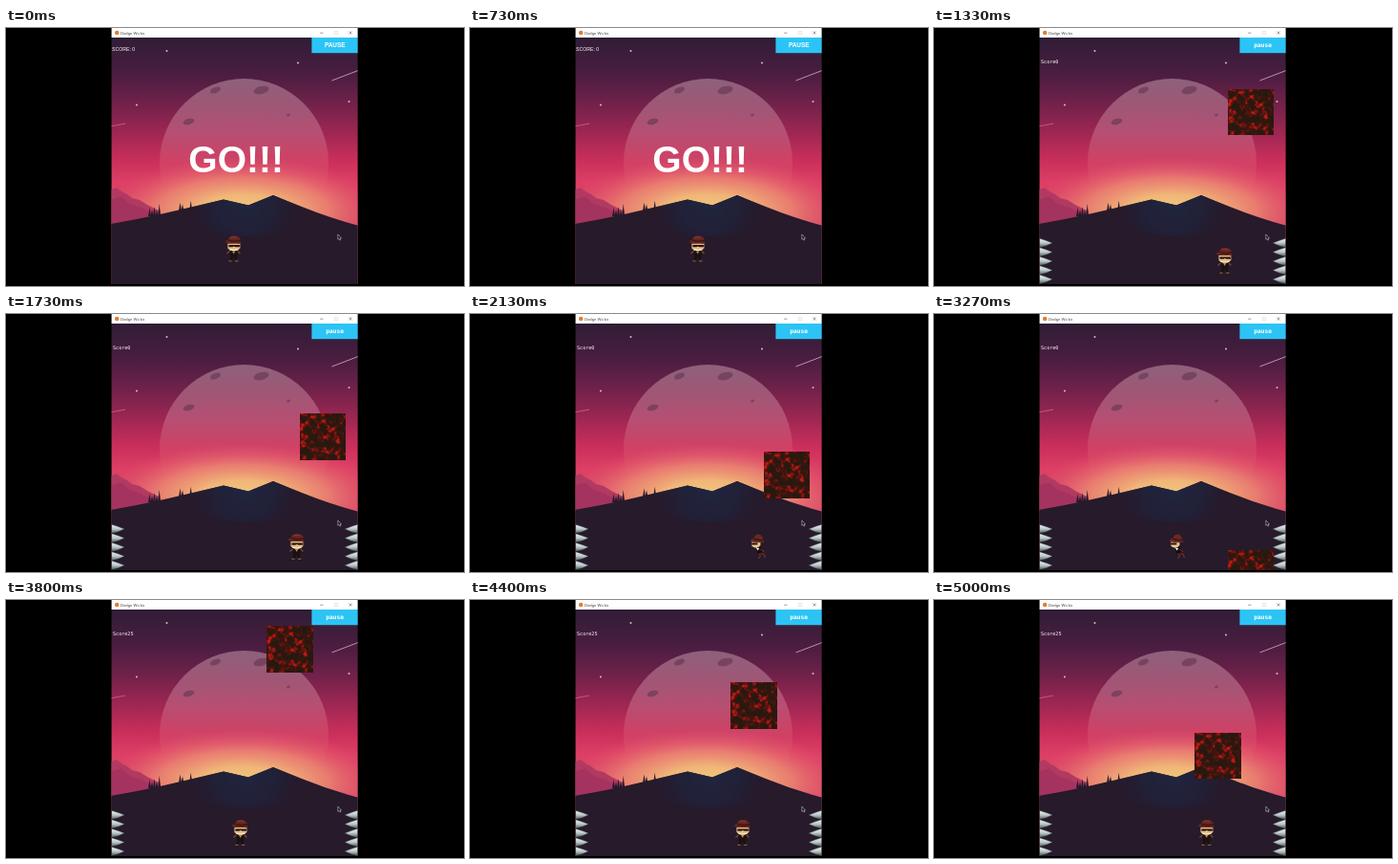
Write an HTML page that moves like this. It is 480 px wide and 270 px high and loops after 5070 ms.

```html
<!DOCTYPE html>
<html lang="en">
<head>
<meta charset="utf-8">
<title>Dodging game</title>
<style>
html, body { margin: 0; width: 100%; height: 100%; overflow: hidden; background: #000; }
svg { display: block; width: 100vw; height: 100vh; }
text { font-family: "Liberation Sans", Arial, sans-serif; fill: #fff; }
.mono { font-family: "DejaVu Sans Mono", monospace; }
</style>
</head>
<body>
<svg viewBox="0 0 480 270">
  <defs>
    <linearGradient id="sky" x1="0" y1="10" x2="0" y2="200" gradientUnits="userSpaceOnUse">
      <stop offset="0" stop-color="#301d36"/>
      <stop offset=".2" stop-color="#4a1d41"/>
      <stop offset=".38" stop-color="#75224b"/>
      <stop offset=".53" stop-color="#a02753"/>
      <stop offset=".68" stop-color="#ca2f5b"/>
      <stop offset=".8" stop-color="#dd3f65"/>
      <stop offset="1" stop-color="#d84a68"/>
    </linearGradient>
    <radialGradient id="glow" cx="0" cy="0" r="1" gradientUnits="userSpaceOnUse"
      gradientTransform="translate(248 191) scale(150 56)">
      <stop offset="0" stop-color="#f3c87c"/>
      <stop offset=".3" stop-color="#f0b678"/>
      <stop offset=".6" stop-color="#ec8a72" stop-opacity=".8"/>
      <stop offset="1" stop-color="#e04a68" stop-opacity="0"/>
    </radialGradient>
    <linearGradient id="moon" x1="0" y1="53" x2="0" y2="168" gradientUnits="userSpaceOnUse">
      <stop offset="0" stop-color="#cfaab8" stop-opacity=".48"/>
      <stop offset=".5" stop-color="#da8ba2" stop-opacity=".4"/>
      <stop offset="1" stop-color="#f58a80" stop-opacity="0"/>
    </linearGradient>
    <radialGradient id="navy" cx="250" cy="182" r="66" gradientUnits="userSpaceOnUse">
      <stop offset="0" stop-color="#20253f"/>
      <stop offset=".5" stop-color="#212037"/>
      <stop offset="1" stop-color="#261a2b" stop-opacity="0"/>
    </radialGradient>
    <linearGradient id="steel" x1="0" y1="0" x2="0" y2="1">
      <stop offset="0" stop-color="#eef2f0"/>
      <stop offset=".5" stop-color="#bcc8c6"/>
      <stop offset="1" stop-color="#46565a"/>
    </linearGradient>
    <filter id="lava" x="0" y="0" width="1" height="1" color-interpolation-filters="sRGB">
      <feTurbulence type="fractalNoise" baseFrequency=".14" numOctaves="4" seed="7"/>
      <feColorMatrix values="2.8 0 0 0 -1  2.8 0 0 0 -1  2.8 0 0 0 -1  0 0 0 0 1"/>
      <feComponentTransfer>
        <feFuncR type="table" tableValues=".15 .17 .25 .48 .72"/>
        <feFuncG type="table" tableValues=".1 .1 .08 .08 .12"/>
        <feFuncB type="table" tableValues=".06 .06 .06 .06 .08"/>
      </feComponentTransfer>
    </filter>
    <clipPath id="view"><rect x="110.600" y="10" width="258" height="258"/></clipPath>
  </defs>

  <rect width="480" height="270" fill="#000"/>
  <g clip-path="url(#view)">
    <rect x="110" y="10" width="260" height="258" fill="url(#sky)"/>
    <rect x="110" y="120" width="260" height="90" fill="url(#glow)"/>
    <circle cx="249.500" cy="141.500" r="88.500" fill="url(#moon)"/>
    <g fill="#6d3d57" fill-opacity=".75">
      <ellipse cx="267.500" cy="65" rx="8.200" ry="4" transform="rotate(-14 267.500 65)"/>
      <ellipse cx="219.500" cy="65" rx="5.800" ry="3" transform="rotate(-22 219.500 65)"/>
      <ellipse cx="191.500" cy="98" rx="6" ry="3" transform="rotate(-16 191.500 98)"/>
      <ellipse cx="296" cy="91" rx="2" ry="1.200" transform="rotate(-20 296 91)"/>
    </g>
    <g fill="#e0b8ca">
      <circle cx="168.500" cy="24" r="1"/><circle cx="306" cy="36.500" r="1"/>
      <circle cx="137" cy="80.500" r="1"/><circle cx="359.500" cy="77" r="1"/>
    </g>
    <path d="M341.500 55L369 44.500" stroke="#c9a0b4" stroke-width=".9"/>
    <path d="M110 102.800L125 100" stroke="#c9668a" stroke-width=".8"/>
    <path d="M110 169L116 167L121 171L127 174L132 178L140 180L148 185L160 191V206H110Z" fill="#b23a62"/>
    <path d="M110 180L120 176L130 184L142 188L152 194V206H110Z" fill="#9c315e" fill-opacity=".6"/>
    <g id="trees" fill="#261a2b"></g>
    <path d="M110 205Q150 198 185 189.500L228 179.500L254 185.500L280 175L310 187Q340 199 370 207V268H110Z" fill="#261a2b"/>
    <path d="M184 190L228 179.500L254 185.500L280 175L316 190Q310 217 250 218Q200 217 184 190Z" fill="url(#navy)"/>
    <g id="spikes" fill="url(#steel)" stroke="#2c383c" stroke-width=".4"></g>

    <g id="hero">
      <g id="idle">
        <path d="M-4 2H4.500L4 8L3.500 13H1.500L.500 9L-1.500 13H-3.500L-3.500 8Z" fill="#1a1112"/>
        <path d="M-4 3L-7 5.500M4.500 3L7 5.500" stroke="#7a4630" stroke-width="1.300"/>
        <path d="M-1.500 3L.300 6L2 3" fill="#b98752"/>
        <path d="M-5 13.300H-1.800M1.500 13.300H5" stroke="#8a5734" stroke-width="1.200"/>
        <path d="M-6-5H7V0Q4 3 .500 2.500Q-4 3-6 0Z" fill="#e3bd86"/>
        <path d="M-5-3.500H6.500V-1.200H2L.500-2L-1-1.200H-5Z" fill="#2a1414"/>
        <path d="M-4 1.300Q.500 3 5 1.300" stroke="#fff1d0" stroke-width="1.200" fill="none"/>
        <path d="M-9-6.500Q-8-8.500-5.500-9Q-5-13 0-13Q6-13.500 7.500-9L8-4.500Q3-5.500-1-5Q-6-4.500-9-6.500Z" fill="#64251f"/>
        <path d="M-5.500-8.500Q0-6.500 7.500-8" stroke="#351416" stroke-width="1.300" fill="none"/>
        <path d="M-3-11Q0-12.500 4-11" stroke="#8d3b2c" stroke-width="1" fill="none"/>
      </g>
      <g id="run">
        <path id="legs" stroke="#713027" stroke-width="1.300" fill="none"/>
        <path d="M-2 2L4 1L5 7L0 8Z" fill="#170e10"/>
        <path d="M3 3L7 6" stroke="#5d2a23" stroke-width="1.300"/>
        <path d="M-6-5H3V-1Q1 2-3 1.500L-6 0Z" fill="#e9c78f"/>
        <path d="M-6-3.500H0V-1.500H-6Z" fill="#1d1012"/>
        <path d="M-2 1L2 2.500L0 4.500Z" fill="#fff1d0"/>
        <path d="M-8-5Q-7-8-4-8.500Q-3-12.500 1-12.500Q5-12 5.500-7.500L7-4Q0-3-8-5Z" fill="#6b2821"/>
        <path d="M-4-7.500L5.500-6" stroke="#351416" stroke-width="1.300"/>
      </g>
    </g>

    <g id="box">
      <rect width="48" height="48" filter="url(#lava)"/>
    </g>
    <rect x="320.400" y="10" width="49" height="16.200" fill="#2bc4f5"/>
    <text id="button" x="344.700" y="20.300" text-anchor="middle" font-weight="bold"></text>
    <text id="score"></text>
    <text id="go" x="191.300" y="150.500" font-size="39" font-weight="bold">GO!!!</text>
    <path d="M347.800 216V221.300L349 220.300L350 222.200L350.800 221.700L350 220H351.500Z" fill="#17131b" stroke="#ddd" stroke-width=".5"/>
  </g>

  <rect x="110.600" width="258" height="10" fill="#fff"/>
  <circle cx="116.200" cy="5" r="2.300" fill="#d9803a"/>
  <text x="120" y="6.500" font-size="4.200" style="fill:#444">Dodge Wu ko</text>
  <path d="M329 5.200H332.500M359.500 3.500L362.500 6.500M362.500 3.500L359.500 6.500" stroke="#666" stroke-width=".6"/>
  <path d="M344.500 3.500H347.500V6.500H344.500Z" fill="none" stroke="#ccc" stroke-width=".5"/>
</svg>
<script>
const $ = id => document.getElementById(id);
const LOOP = 5070, STEP = 1000 / 15, START = 20, SECOND = 52;

// Keys are [step, value] pairs, counted in steps of 1/15 s.
const box1 = [[20, 64], [32, 144.5], [41, 198.5], [52, 266]];
const box2 = [[52, -5], [57, 27.7], [66, 86.5], [75, 139]];
const heroX = [[0, 238], [19, 238], [20, 304], [31, 304], [32, 301], [41, 278], [52, 245], [58, 245], [65, 285]];

function track(keys, n) {
  for (let i = 1; i < keys.length; i++) {
    const [a, from] = keys[i - 1], [b, to] = keys[i];
    if (n <= b) return from + (to - from) * Math.max(0, n - a) / (b - a);
  }
  return keys[keys.length - 1][1];
}

const tree = (x, base, h) =>
  `<path d="M${x} ${base - h}L${x + 1.5} ${base}H${x - 1.5}Z"/>`;
$("trees").innerHTML =
  [[150.5, 9], [153, 7], [155.5, 10], [158, 7], [160.7, 13]].map(([x, h]) => tree(x, 197, h)).join("") +
  [[182.5, 9], [185, 7], [193.7, 11]].map(([x, h]) => tree(x, 191.5, h)).join("");

const spike = (x, dir, y) =>
  `<path d="M${x} ${y}Q${x + dir * 7} ${y + 2} ${x + dir * 13.5} ${y + 4.6}Q${x + dir * 7} ${y + 8} ${x} ${y + 9.4}Z"/>`;
let spikes = "";
for (let i = 0; i < 5; i++) {
  const y = 220.3 + i * 9.5;
  spikes += spike(110.6, 1, y) + spike(368.6, -1, y);
}
$("spikes").innerHTML = spikes;

function show(el, on) { el.style.display = on ? "" : "none"; }

function label(el, text, size, mono) {
  el.textContent = text;
  el.setAttribute("font-size", size);
  el.setAttribute("class", mono ? "mono" : "");
}

function place(el, x, y) { el.setAttribute("transform", `translate(${x} ${y})`); }

function draw(time) {
  const n = Math.floor((time % LOOP + 5) / STEP);
  const playing = n >= START, second = n >= SECOND;
  for (const id of ["spikes", "box"]) show($(id), playing);
  show($("go"), !playing);

  label($("button"), playing ? "pause" : "PAUSE", playing ? 6.3 : 6.4, playing);
  label($("score"), playing ? (second ? "Score25" : "Score0") : "SCORE: 0", playing ? 5.1 : 5.2, playing);
  $("score").setAttribute("x", playing ? 112 : 111);
  $("score").setAttribute("y", playing ? 37.2 : 24.2);

  place($("box"), second ? 273.8 : 308, track(second ? box2 : box1, n));
  place($("hero"), track(heroX, n) + .4, playing ? 243 : 230.5);

  const left = n >= 32 && n < SECOND, right = n > 58 && n < 65;
  show($("idle"), !left && !right);
  show($("run"), left || right);
  $("run").setAttribute("transform", right ? "scale(-1 1)" : "");
  $("legs").setAttribute("d", (n >> 1) % 2
    ? "M1 7L-1 11L-3 13M3 7L5 10L4 13"
    : "M1 7L3 10L1 13M3 7L7 9L8 12");
}

function tick(now) {
  draw(now);
  requestAnimationFrame(tick);
}
draw(0);
requestAnimationFrame(tick);
</script>
</body>
</html>
```
